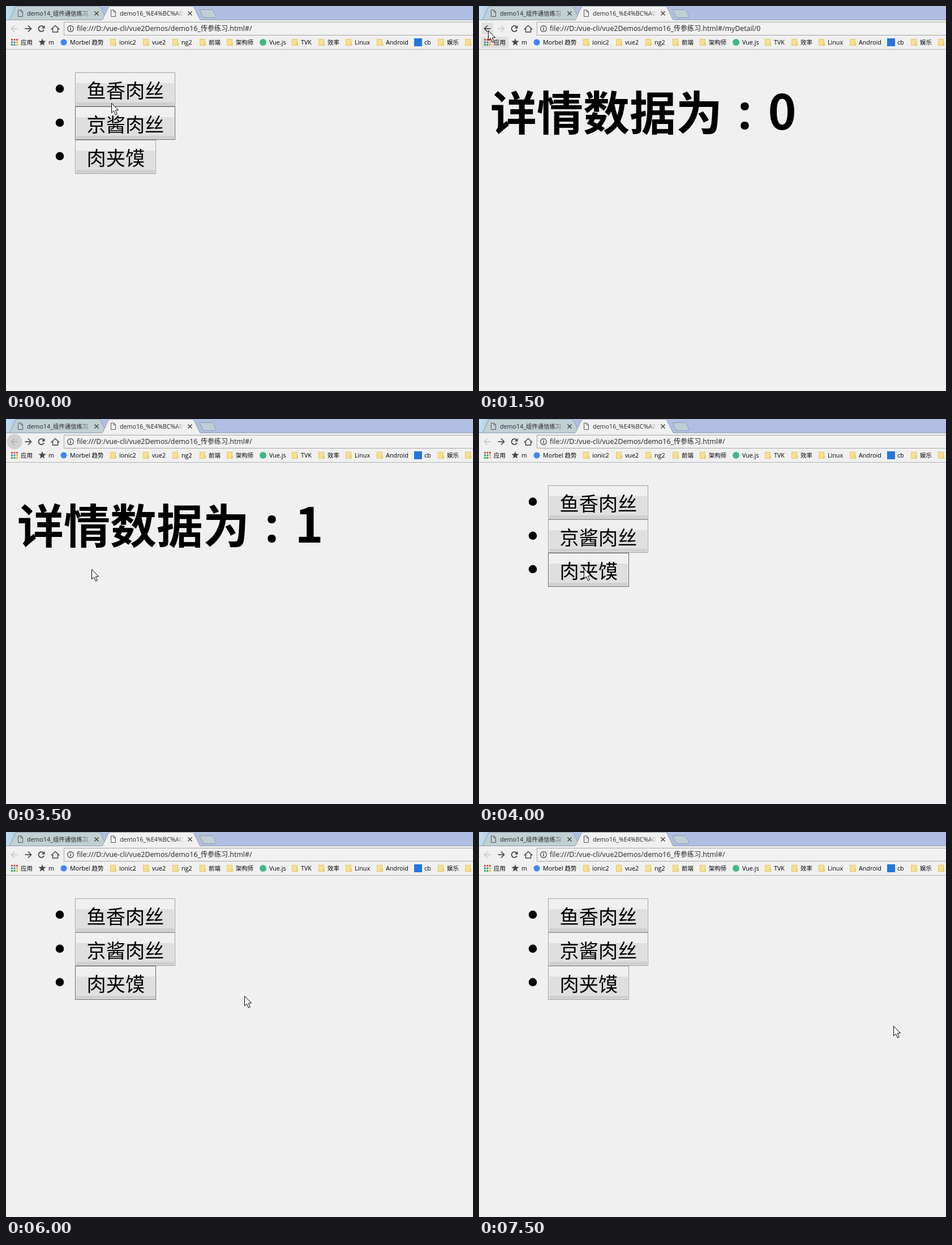
These frames come from a looping animation (825 px wide and 679 px high, 8000 ms). An HTML page with a canvas:

```html
<!DOCTYPE html>
<html lang="zh-CN">
<head>
<meta charset="utf-8">
<title>路由传参</title>
<style>
html, body { margin: 0; width: 100%; height: 100%; overflow: hidden; background: #f0f0f0; }
canvas { display: block; }
</style>
</head>
<body>
<canvas id="stage" width="825" height="679"></canvas>
<script>
const ctx = document.getElementById('stage').getContext('2d');
const BG = '#f0f0f0', STEP = 500;
const LATIN = '"Open Sans", "Noto Sans", "Noto Sans CJK SC", sans-serif';
const CJK = '"Noto Sans CJK SC", "Noto Sans CJK", sans-serif';

function rect(x, y, w, h, fill, stroke) {
  if (fill) { ctx.fillStyle = fill; ctx.fillRect(x, y, w, h); }
  if (stroke) { ctx.strokeStyle = stroke; ctx.lineWidth = 1; ctx.strokeRect(x + .5, y + .5, w - 1, h - 1); }
}
function poly(points, fill, stroke, width = 1, closed = true) {
  ctx.beginPath();
  points.forEach(([x, y]) => ctx.lineTo(x, y));
  if (closed) ctx.closePath();
  paint(fill, stroke, width);
}
function circle(x, y, r, fill, stroke, width = 1) {
  ctx.beginPath();
  ctx.arc(x, y, r, 0, 7);
  paint(fill, stroke, width);
}
function paint(fill, stroke, width) {
  if (fill) { ctx.fillStyle = fill; ctx.fill(); }
  if (stroke) { ctx.strokeStyle = stroke; ctx.lineWidth = width; ctx.stroke(); }
}
function line(color, width, ...points) { poly(points, null, color, width, false); }
function fade(x0, y0, x1, y1, ...colors) {
  const g = ctx.createLinearGradient(x0, y0, x1, y1);
  colors.forEach((c, i) => g.addColorStop(i / (colors.length - 1), c));
  return g;
}

// Mixed text, vertically centred on y; Latin runs are set slightly larger.
function text(str, x, y, { size = 10.4, color = '#000', right = false } = {}) {
  const runs = str.match(/[\u3000-\u9fff\uff00-\uffef]+|[^\u3000-\u9fff\uff00-\uffef]+/g).map(s => {
    const cjk = /[\u3000-\u9fff\uff00-\uffef]/.test(s);
    const font = cjk ? `${size}px ${CJK}` : `${size * 1.032}px ${LATIN}`;
    ctx.font = font;
    return { s, font, w: ctx.measureText(s).width };
  });
  if (right) x -= runs.reduce((sum, r) => sum + r.w, 0);
  ctx.fillStyle = color;
  for (const r of runs) {
    ctx.font = r.font;
    ctx.fillText(r.s, x, y + size * .37);
    x += r.w;
  }
}

function star(x, y, r, fill) {
  poly(Array.from({ length: 10 }, (_, i) => {
    const a = i * Math.PI / 5 - Math.PI / 2, d = i % 2 ? r * .42 : r;
    return [x + d * Math.cos(a), y + d * Math.sin(a)];
  }), fill);
}
function triangle(x, y, down, color = '#222') {
  poly(down ? [[x - 3.5, y - 2], [x + 3.5, y - 2], [x, y + 2]] : [[x - 1.5, y - 3], [x + 2, y], [x - 1.5, y + 3]], color);
}
function arrow(x, y, dir, color) {
  line(color, 1.7, [x - 5.5 * dir, y], [x + 5 * dir, y]);
  line(color, 1.7, [x, y - 5.5], [x + 5.5 * dir, y], [x, y + 5.5]);
}
function cursor(x, y) {
  poly([[0, 0], [0, 17], [4, 13.5], [7, 20.5], [9.7, 19.3], [6.8, 12.5], [12, 12]]
    .map(([a, b]) => [x + .5 + a, y + .5 + b]), '#fff', '#000');
}

function tab(left, right, title, fill) {
  poly([[left, 25.5], [left + 2, 23], [left + 12, 2], [left + 14, .5], [right - 14, .5], [right - 12, 2], [right - 2, 23], [right, 25.5]],
    fill, '#8e9cac', 1, false);
  const x = left + 16;
  poly([[x + .5, 7], [x + 5.5, 7], [x + 8.5, 10], [x + 8.5, 18.5], [x + .5, 18.5]], null, '#555');
  line('#555', 1, [x + 5.5, 7], [x + 5.5, 10.5], [x + 8.5, 10.5]);
  ctx.save();
  ctx.beginPath();
  ctx.rect(x + 16, 2, 112, 22);
  ctx.clip();
  text(title, x + 16, 13, { color: '#222' });
  ctx.restore();
  rect(x + 114, 3, 15, 20, fade(x + 114, 0, x + 129, 0, fill + '00', fill));
  const c = right - 19;
  line('#444', 1.5, [c - 3.5, 9.5], [c + 3.5, 16.5]);
  line('#444', 1.5, [c + 3.5, 9.5], [c - 3.5, 16.5]);
}

const bookmarks = [
  ['ionic2', 200], ['vue2', 258], ['ng2', 310], ['前端', 358], ['架构师', 406], ['TVK', 521],
  ['效率', 568], ['Linux', 616], ['Android', 671], ['娱乐', 779], ['', 827]
];

function chrome({ url, back, apps }) {
  rect(0, 0, 825, 25, '#b0bfe1');
  rect(0, 0, 18, 25, fade(0, 0, 18, 0, '#bfe2f0', '#b6cbe6'));
  tab(5, 179, 'demo14_组件通信练习.html', '#c1d0d3');
  line('#8e9cac', 1, [0, 24.5], [825, 24.5]);
  tab(169, 344, 'demo16_%E4%BC%A0%E5', BG);
  poly([[342, 7], [346, 6.5], [364, 6.5], [366, 8], [371, 18], [370, 20.5], [351, 20.5], [348, 19]], '#bfcfd5', '#8e9cac');
  rect(0, 25, 825, 51, BG);

  if (back === 'ripple') circle(15, 40, 13.5, '#d0d0d0');
  else if (back) rect(5, 30, 20, 20, back === 'press' ? '#cecece' : '#dfdfdf');
  const faint = back === 'ripple' ? '#b0b0b0' : '#c8c8c8';
  arrow(15, 40, -1, url ? '#444' : faint);
  arrow(39, 40, 1, url ? '#ccc' : '#444');
  ctx.beginPath();
  ctx.arc(62.5, 40, 5, .4, 5.5);
  paint(null, '#444', 1.7);
  poly([[68.5, 34], [68.5, 39.5], [63, 39.5]], '#444');
  poly([[80.5, 40.5], [87, 34.5], [93.5, 40.5], [91.5, 40.5], [91.5, 46], [82.5, 46], [82.5, 40.5]], null, '#444', 1.4);
  rect(102, 28, 730, 24, '#f1f1f1', '#a6a6a6');
  circle(114, 40, 5.3, null, '#444', 1.2);
  rect(113.3, 39, 1.5, 4, '#444');
  rect(113.3, 36.6, 1.5, 1.5, '#444');
  text('file:///D:/vue-cli/vue2Demos/demo16_传参练习.html#/' + url, 125, 40, { size: 12, color: '#222' });

  if (apps) rect(3, 54, 49, 20, '#dfdfdf');
  const dots = ['#e04a3f', '#e04a3f', '#e04a3f', '#2f9e5b', '#4080e8', '#f0b428', '#2f9e5b', '#2f9e5b', '#f0b428'];
  dots.forEach((c, i) => rect(9 + i % 3 * 4.5, 58 + Math.floor(i / 3) * 4.5, 3, 3, c));
  text('应用', 26, 64);
  star(64, 64, 7, '#484848');
  text('m', 75, 64);
  circle(102, 64, 5.5, '#4285f4');
  text('Morbel 趋势', 113, 64);
  for (const [label, x] of bookmarks) {
    rect(x - 16, 58, 10, 12, '#f7e08f', '#e3c767');
    rect(x - 8, 65, 3, 5, '#f7e08f', '#e3c767');
    if (label) text(label, x, 64);
  }
  circle(454, 64, 6, '#41b883');
  text('Vue.js', 465, 64);
  rect(721, 57, 14, 14, '#2476dc');
  text('cb', 739, 64);
  line('#b2b2b2', 1, [0, 76.5], [825, 76.5]);
}

function list(hot) {
  [['鱼香肉丝', 117, 177, 60], ['京酱肉丝', 177, 177, 59], ['肉夹馍', 236, 143, 60]].forEach(([label, y, w, h], i) => {
    circle(95, y + 28.8, 7.3, '#000');
    rect(122, y, w, h, BG);
    rect(124, y + 19, w - 4, h - 20, '#dfdfdf');
    rect(124, y + h - 7, w - 4, 5, '#cfcfcf');
    rect(122, y, w, h, null, hot === i + 1 ? '#666' : '#a0a0a0');
    text(label, 142.5, y + 32, { size: 34.2 });
  });
}

function detail(n) {
  ctx.fillStyle = '#000';
  ctx.font = `bold 82px ${CJK}`;
  ctx.fillText('详情数据为', 20, 219);
  ctx.textAlign = 'center';
  ctx.font = `bold 85px ${CJK}`;
  ctx.fillText(n, 535.5, 218);
  ctx.font = `bold 84px ${LATIN}`;
  ctx.fillText(':', 469.5, 217);
  ctx.textAlign = 'left';
}

// Small explorer icons, drawn around a centre point.
const icons = {
  folder(x, y, c = '#f1dc86') {
    poly([[x - 5, y - 6], [x + 1, y - 6], [x + 1, y - 4], [x + 5, y - 4], [x + 5, y + 6], [x - 5, y + 6]], c, '#dcc062');
    rect(x - 1, y - 2, 2, 8, '#c9a640');
  },
  pale(x, y) { icons.folder(x, y, '#f8efc9'); },
  locked(x, y) { icons.pale(x, y); rect(x - 6, y + 1, 6, 5, '#b5853a'); circle(x - 3, y, 2, null, '#777'); },
  down(x, y) { icons.folder(x, y); poly([[x, y + 1], [x + 6, y + 1], [x + 3, y + 6]], '#2a7ac8'); },
  star(x, y) { star(x, y, 7, '#f2a52c'); },
  desk(x, y) { rect(x - 6, y - 5, 13, 10, '#2866b0', '#47607c'); rect(x - 5, y + 2, 11, 2, '#173e78'); },
  page(x, y) { rect(x - 5, y - 6, 11, 13, '#fafafa', '#9a9a9a'); },
  note(x, y) { icons.page(x, y); for (let i = -3; i < 5; i += 2) rect(x - 3, y + i, 7, 1, '#9db0c4'); },
  script(x, y) { icons.page(x, y); rect(x - 3, y - 3, 7, 6, '#444'); },
  library(x, y) { icons.folder(x - 1, y); rect(x - 2, y - 2, 8, 7, '#8ec8ec', '#5598c4'); },
  film(x, y) { rect(x - 5, y - 6, 11, 13, '#263f57'); rect(x - 2, y - 5, 5, 5, '#5ba4d8'); rect(x - 2, y + 1, 5, 5, '#5ba4d8'); },
  image(x, y) { rect(x - 6, y - 5, 13, 10, '#f5f8fa', '#8a9aa8'); rect(x - 4, y - 3, 9, 6, '#63acd8'); },
  music(x, y) { circle(x - 2, y + 4, 2.7, '#2484d6'); line('#2484d6', 1.8, [x, y + 4], [x, y - 6], [x + 4, y - 1]); },
  pc(x, y) { rect(x - 4, y - 5, 11, 8, '#3476bd', '#667788'); rect(x - 6, y - 4, 3, 10, '#888'); rect(x, y + 4, 5, 2, '#888'); },
  drive(x, y) { poly([[x - 5, y], [x + 4, y], [x + 7, y + 3], [x + 7, y + 6], [x - 7, y + 6], [x - 7, y + 3]], '#c6cbd0', '#82888e'); rect(x + 3, y + 4, 2, 1, '#32a852'); },
  system(x, y) { icons.drive(x, y); rect(x - 5, y - 6, 8, 6, '#e5a535'); },
  disc(x, y) { icons.drive(x, y); circle(x + 1, y - 2, 4.5, '#d7dde4', '#8d99a5'); },
  ball(x, y) { circle(x, y, 5, '#245fa8'); },
  teal(x, y) { rect(x - 7, y - 5, 14, 11, '#2aa882'); },
  zip(x, y) { rect(x - 6, y - 6, 13, 12, '#377dc0'); },
  app(x, y) { rect(x - 6, y - 5, 13, 11, '#fafafa', '#8a9aaa'); rect(x - 5, y - 4, 11, 2, '#97b3d2'); rect(x - 4, y - 1, 4, 4, '#4b83b9'); }
};

// Sidebar rows on one grid; a leading space marks an indented row.
const sidebar = `star|收藏夹
down| 下载
desk| 桌面
note| 最近访问的位置
folder| 备课文档
folder| angularJS
folder| htdocs
folder| moritavel
folder| project-ng2
folder| kfl_vue
folder| vue2Examples
folder| --------课程--------
folder| ionic2
folder| moritavel 用户目录
folder| npm

library|库
film| 视频
image| 图片
note| 文档
music| 音乐

pc|计算机
system| 本地磁盘 (C:)
drive| 软件 (D:)
drive| 文档 (E:)
drive| 娱乐 (F:)
ball| 小山杏U盘 (H:)
disc| CD 驱动器 (I:)

ball|网络`.split('\n').map(row => row.split('|'));

const files = `$GetCurrent|2016/7/27 9:19|pale
QVL|2016/7/1 11:12
DRIVERS|2016/6/27 18:03
EFI|2016/6/27 14:17
Norvo|2016/6/27 15:44
RUKCache|2016/6/27 16:23|locked
My Sketches|2017/3/3 13:17
OpenSSL-Win64|2016/7/7 10:09
PerfLogs|2009/7/14 11:20
phonegapDemo|2016/8/16 7:25
Program Files|2017/4/24 20:03
Program Files (x86)|2017/5/25 23:16
ProgramData|2017/5/22 16:21|pale
Python27|2016/7/7 22:18
Maplodo|2017/4/16 13:37
win|2014/1/17 14:23
Windows|2017/6/1 20:09
xampp|2016/7/1 10:58
用户|2016/7/5 15:26
test.js|2016/8/4 23:12|script|JS 文件|1 KB
.rnd|2017/4/24 12:05|page|RND 文件|1 KB
test.txt|2017/5/31 13:55|note|文本文档|2 KB
kaifanla-test.sql|2016/12/1 10:56|page|SQL 文件|7 KB
路由传参.gif|2017/6/2 8:05|teal|阅影匠 GIF 图片...|183 KB
win.zip|2017/3/5 9:27|zip|725归档 ZIP 文件|205 KB
openssl.exe|2013/2/19 20:48|app|应用程序|407 KB
组件间通信.gif|2017/6/2 8:03|teal|阅影匠 GIF 图片...|645 KB
yuicompressor-2.4.8.jar|2016/3/31 10:16|note|Executable Jar File|770 KB`.split('\n').map(row => row.split('|'));

function explorer() {
  rect(0, 0, 825, 49, fade(0, 0, 0, 49, '#b0bfe1', '#b2c3e3', '#c3d6e8'));
  rect(60, 22, 770, 20, '#e1edf0', '#8296ae');
  circle(37, 33, 10, fade(0, 23, 0, 43, '#dce5ee', '#a3b4c8'), '#71869e');
  circle(13, 33, 10, fade(0, 23, 0, 43, '#6ba5dc', '#174f9c', '#2b8bd0'), '#28476d');
  line('#fff', 2.6, [8, 33], [19, 33]);
  line('#fff', 2.6, [12.5, 28], [7.5, 33], [12.5, 38]);
  triangle(54, 33, true, '#24548c');
  icons.system(70, 32);
  [86, 137, 219].forEach(x => triangle(x, 32, false));
  text('计算机', 96, 32);
  text('本地磁盘 (C:)', 148, 32);

  rect(0, 48, 825, 28, fade(0, 48, 0, 75, '#f0f4f6', '#dfe9f1', '#d5e3ef'));
  line('#a2b4c8', 1, [0, 48.5], [825, 48.5]);
  line('#a2b4c8', 1, [0, 75.5], [825, 75.5]);
  const ink = { color: '#1e395b' };
  text('组织', 15, 62, ink);
  triangle(44, 62, true, '#1e395b');
  rect(73, 55, 13, 13, '#d7a52c');
  text('打开', 90, 62, ink);
  triangle(122, 62, true, '#1e395b');
  text('打印', 151, 62, ink);
  text('新建文件夹', 197, 62, ink);

  line('#d3dce6', 1, [204.5, 76], [204.5, 679]);
  [436, 538, 640, 708].forEach(x => line('#dbe0e6', 1, [x + .5, 76], [x + .5, 94]));
  [['名称', 220], ['修改日期', 442], ['类型', 544], ['大小', 646]].forEach(([s, x]) => text(s, x, 87.5, { color: '#4c607a' }));
  poly([[671, 80], [674, 77], [677, 80]], '#6d8ba8');

  rect(1, 533, 203, 20, fade(0, 533, 0, 553, '#ececec', '#e0e0e0'), '#d2d2d2');
  sidebar.forEach(([icon, label], i) => {
    if (!label) return;
    const y = 93 + i * 19.58, inner = label[0] === ' ';
    icons[icon](inner ? 32 : 23, Math.round(y));
    text(label.trim(), inner ? 43 : 35, y);
  });

  rect(218, 514, 488, 19, fade(0, 514, 0, 533, '#d9e6f3', '#b6d0ea'), '#7d9fc6');
  const gray = { color: '#666' };
  files.forEach(([name, date, icon = 'folder', type = '文件夹', size], i) => {
    const y = 113 + i * 17.85;
    icons[icon](228, Math.round(y));
    text(name, 238, y);
    text(date, 442, y, gray);
    text(type, 544, y, gray);
    if (size) text(size, 702, y, { ...gray, right: true });
  });
}

// One entry per half second: what is shown and where the pointer rests.
const scenes = [
  { at: [186, 171], hot: 2 },
  { at: [186, 151], hot: 1 },
  { at: [55, 96], item: 0 },
  { at: [16, 43], item: 0, back: 'hover', apps: true },
  { at: [175, 206], hot: 2 },
  { at: [180, 229], item: 1 },
  { at: [15, 43], item: 1, back: 'hover' },
  { at: [151, 265], item: 1, back: 'ripple', url: '' },
  { at: [185, 264], hot: 3 },
  { at: [51, 91], item: 2 },
  { at: [13, 42], item: 2, back: 'press' },
  { at: [13, 42], back: 'ripple', hot: 3 },
  { at: [421, 289], hot: 3 },
  { files: true },
  { files: true },
  { at: [732, 342] }
];

function draw(scene) {
  rect(0, 0, 825, 679, BG);
  if (scene.files) return explorer();
  const { item, hot, at } = scene;
  const url = scene.url ?? (item === undefined ? '' : 'myDetail/' + item);
  chrome({ ...scene, url });
  if (item === undefined) list(hot);
  else detail(item);
  cursor(...at);
}

const start = performance.now();
function tick() {
  const elapsed = performance.now() - start;
  draw(scenes[Math.floor(elapsed / STEP) % scenes.length]);
  requestAnimationFrame(tick);
}
tick();
</script>
</body>
</html>
```
